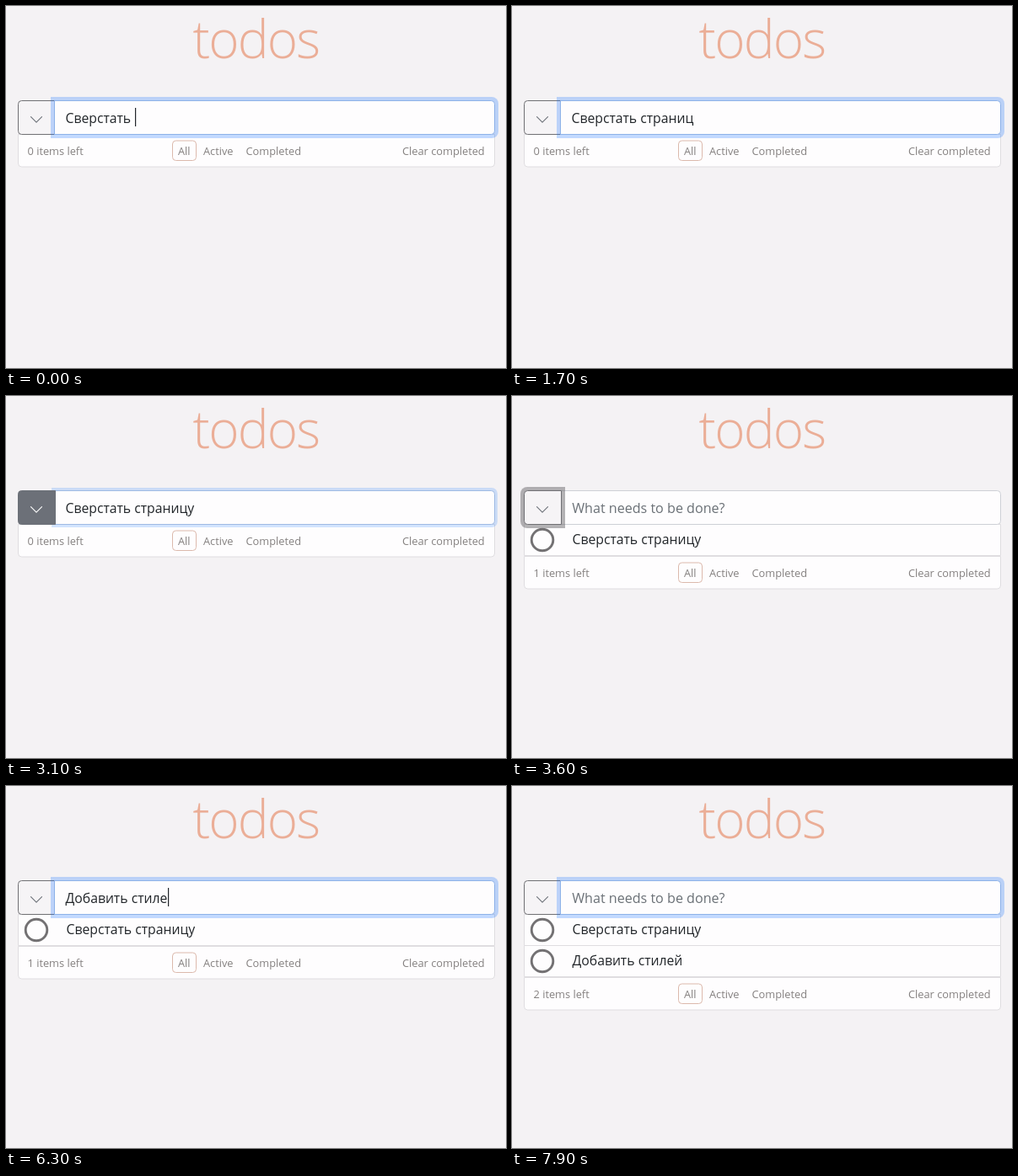
An HTML page that plays this animation: 593x430 px, repeating every 8000 ms.

```html
<!DOCTYPE html>
<html lang="ru">
<head>
<meta charset="utf-8">
<title>todos</title>
<style>
  html, body { margin: 0; width: 100%; height: 100%; overflow: hidden; background: #f4f2f4; }
  svg { display: block; width: 593px; height: 430px; }
  text { font-family: "Open Sans", "Noto Sans", sans-serif; font-size: 15.75px; fill: #212529; white-space: pre; }
  .title { font-size: 62px; font-weight: 300; letter-spacing: -1.9px; fill: #ebae97; }
  .hint { font-size: 16.1px; fill: #6a7076; }
  .foot text { font-size: 12.8px; fill: #858180; }
  .panel { fill: #fefdfe; stroke: #dfdde0; }
  .check { fill: none; stroke: #737173; stroke-width: 2.9; }
  .pill { fill: none; stroke: #dcb9ac; }
</style>
</head>
<body>
<svg viewBox="0 0 593 430">
  <text class="title" x="221.5" y="62">todos</text>

  <g id="item1">
    <path class="panel" d="M14.5 152.5H579.5V189.5H14.5Z"/>
    <circle class="check" cx="36" cy="171" r="12.8"/>
    <text x="71.5" y="175.5">Сверстать страницу</text>
  </g>
  <g id="item2">
    <path class="panel" d="M14.5 189.5H579.5V226.5H14.5Z"/>
    <circle class="check" cx="36" cy="208" r="12.8"/>
    <text x="71.5" y="212.5">Добавить стилей</text>
  </g>

  <g id="foot" class="foot">
    <path class="panel" d="M14.5 152.5H579.5V187a4 4 0 0 1-4 4H18.5a4 4 0 0 1-4-4Z"/>
    <text id="count" x="25.5" y="177"></text>
    <rect class="pill" x="197.5" y="160" width="28" height="23.5" rx="4"/>
    <text x="204" y="177">All</text>
    <text x="234" y="177">Active</text>
    <text x="284.5" y="177">Completed</text>
    <text x="470" y="177">Clear completed</text>
  </g>

  <g id="bar">
    <g id="button">
      <path id="buttonRing" fill="#6c6a6e"/>
      <path id="buttonBox"/>
      <path id="chevron" d="M29.5 131.7L36 138.2L42.5 131.7" fill="none" stroke-width="1.1" stroke-linecap="round" stroke-linejoin="round"/>
    </g>
    <g id="input">
      <path id="inputRing" fill="#0d6efd"/>
      <path id="inputBox" fill="#fefdfe"/>
      <text id="hint" class="hint" x="71.2" y="139">What needs to be done?</text>
      <text id="typed" x="70.5" y="139"></text>
      <rect id="caret" y="121" width="1.2" height="22" fill="#212529"/>
    </g>
  </g>
</svg>
<script>
const LOOP = 8000;
const FIRST = "Сверстать страницу", SECOND = "Добавить стилей";
const PRESS = 3060, ADD_FIRST = 3200, REFOCUS = 4060, ADD_SECOND = 7200;

// time, letters typed, caret blink phase
const KEYS = [
  [0, 10, 400], [400, 11], [600, 12], [800, 13], [1000, 14], [1300, 15],
  [1400, 16], [1500, 17], [1700, 17, 500], [1900, 18],
  [ADD_FIRST, 0], [REFOCUS, 0], [4800, 1], [5000, 2], [5100, 3], [5200, 4],
  [5300, 5], [5400, 6], [5500, 7], [5700, 8], [5800, 9], [5900, 10],
  [6000, 11], [6100, 12], [6200, 13], [6300, 14], [6500, 15], [ADD_SECOND, 0]
];

const el = {};
document.querySelectorAll("[id]").forEach(node => el[node.id] = node);

const ramp = (t, start) => Math.min(1, Math.max(0, (t - start) / 150));
const show = (node, on) => node.setAttribute("visibility", on ? "visible" : "hidden");
const mix = (a, b, k) => `rgb(${a.map((v, i) => Math.round(v + (b[i] - v) * k))})`;

// Box with separate corner radii on its left and right side
function box(x, y, w, h, left, right) {
  const arc = (r, dx, dy) => `a${r} ${r} 0 0 1 ${dx * r} ${dy * r}`;
  return `M${x + left} ${y}H${x + w - right}${arc(right, 1, 1)}V${y + h - right}${arc(right, -1, 1)}` +
    `H${x + left}${arc(left, -1, -1)}V${y + left}${arc(left, 1, -1)}Z`;
}

function setRing(node, x, w, left, right, k, alpha) {
  const s = 4 * k;
  node.setAttribute("d", box(x - s, 112 - s, w + 2 * s, 41 + 2 * s,
    left && left + s, right && right + s));
  node.setAttribute("fill-opacity", alpha * k);
}

el.buttonBox.setAttribute("d", box(14.5, 112.5, 44, 40, 4, 0));
el.inputBox.setAttribute("d", box(57.5, 112.5, 522, 40, 0, 4));

const GREY = [108, 112, 120], PALE = [246, 244, 246], WHITE = [255, 255, 255];

function draw(t) {
  const focused = t < PRESS || t >= REFOCUS;
  const inputGlow = 1 - ramp(t, PRESS) + ramp(t, REFOCUS);
  const buttonGlow = ramp(t, PRESS + 30) - ramp(t, REFOCUS);
  const hover = ramp(t, 2800) - ramp(t, 3400);

  const top = focused ? el.input : el.button;
  if (el.bar.lastElementChild !== top) el.bar.appendChild(top);

  setRing(el.inputRing, 57, 523, 0, 4, inputGlow, 0.25);
  setRing(el.buttonRing, 14, 45, 4, 0, buttonGlow, 0.5);
  el.inputBox.setAttribute("stroke", mix([206, 208, 214], [142, 178, 232], inputGlow));
  el.buttonBox.setAttribute("fill", mix(PALE, GREY, hover));
  el.buttonBox.setAttribute("stroke", mix([112, 112, 116], GREY, hover));
  el.chevron.setAttribute("stroke", mix(GREY, WHITE, hover));

  const [since, letters, phase = 0] = KEYS.findLast(key => key[0] <= t);
  el.typed.textContent = (t < ADD_FIRST ? FIRST : SECOND).slice(0, letters);
  show(el.hint, !letters);
  const end = letters ? el.typed.getComputedTextLength() : 0;
  el.caret.setAttribute("x", 71 + Math.round(end));
  show(el.caret, focused && (t - since + phase) % 1000 < 500);

  const items = t < ADD_FIRST ? 0 : t < ADD_SECOND ? 1 : 2;
  show(el.item1, items > 0);
  show(el.item2, items > 1);
  el.count.textContent = `${items} items left`;
  el.foot.setAttribute("transform", `translate(0 ${Math.ceil(items * 37.5)})`);
}

const start = performance.now();
function tick() {
  draw((performance.now() - start) % LOOP);
  requestAnimationFrame(tick);
}
tick();
</script>
</body>
</html>
```
